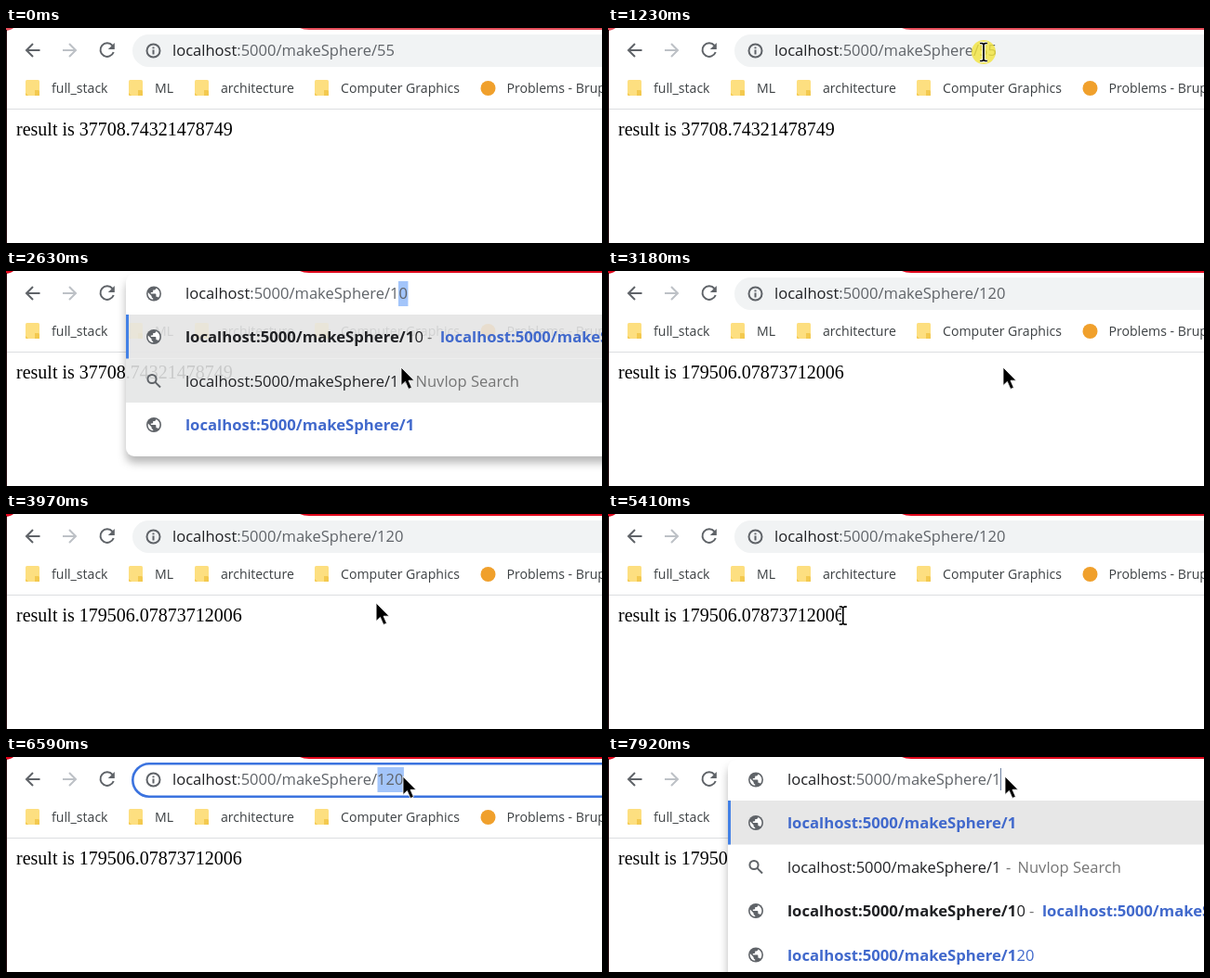
An HTML page for the animation above (8000 ms loop, 641 by 232 pixels).

```html
<!DOCTYPE html>
<html lang="en">
<head>
<meta charset="utf-8">
<title>Address bar demo</title>
<style>
html, body { margin: 0; width: 100%; height: 100%; overflow: hidden; background: #fff; }
svg { display: block; width: 641px; height: 232px; }
text { font: 16.55px "Open Sans", sans-serif; fill: #202124; }
.mark { font-size: 14.1px; fill: #3c4043; }
.page { font: 20px "Liberation Serif", "Times New Roman", serif; fill: #000; }
.dim { fill: #5f6368; }
.note { fill: #757575; }
.bold, .link { font-weight: 700; font-size: 16.7px; }
.link, .blue { fill: #4169cc; }
.panel { filter: drop-shadow(0 7px 5px rgba(0, 0, 0, .28)); }
.line { fill: none; stroke: #5f6368; stroke-width: 2; }
</style>
</head>
<body>
<svg viewBox="0 0 641 232">
  <defs>
    <clipPath id="body"><rect x="129" y="47" width="512" height="153"/></clipPath>
    <g id="globe">
      <circle r="8" fill="#5f6368"/>
      <path d="M-6.2-1.4L-2.4 2.4V3.4Q-2.2 4.8-.8 4.9V6.3Q-5.8 5.4-6.4 .4ZM2.4-5.9Q6.2-4 6.4 0Q6.4 2.2 4.9 4.2Q4.4 3.2 3.2 3.2H2.4V.9Q2.3 0 1.6 0H-3.2V-1.6H-1.6Q-.8-1.7-.8-2.4V-4H.8Q2.3-4.2 2.4-5.9Z" fill="#fff"/>
    </g>
    <g id="lens">
      <circle cx="-2" cy="-2" r="4.6" class="line"/>
      <path d="M1.4 1.4L7 7" class="line"/>
    </g>
    <g id="folder">
      <rect width="15" height="17" rx="1.5" fill="#fddf80"/>
      <path d="M10 17V11H13.5Q15 11 15 12.500V17Z" fill="#f3c94f"/>
      <path d="M0 14L3 17H1.500Q0 17 0 15.500Z" fill="#f3c94f"/>
    </g>
  </defs>
  <g id="scene"></g>
  <circle id="spot" r="13" fill="#f3e33c" opacity=".8"/>
  <path id="arrow" d="M0 0V19.500L4.400 15.400L7.900 23.400L11.400 21.900L8 14.200H14Z" stroke="#fff" stroke-width=".8"/>
  <g id="beam" fill="none">
    <path d="M-4-9.500H-1.500L0-8.500L1.500-9.500H4M0-8.500V8.500M-4 9.500H-1.500L0 8.500L1.500 9.500H4" stroke="#fff" stroke-width="3.500"/>
    <path d="M-4-9.500H-1.500L0-8.500L1.500-9.500H4M0-8.500V8.500M-4 9.500H-1.500L0 8.500L1.500 9.500H4" stroke="#000" stroke-width="1.700"/>
  </g>
</svg>
<script>
const LOOP = 8000, TICK = 68.7;
const PATH = '/makeSphere/', HOST = 'localhost', PORT = ':5000';
const URL_TEXT = HOST + PORT + PATH;
const DIGIT = 9.46, PREFIX = 220.5, ROW = 47.5;
const $ = id => document.getElementById(id);

const text = (x, y, s, cls = '') => `<text x="${x}" y="${y}" class="${cls}">${s}</text>`;
const rect = (x, y, w, h, fill, more = '') =>
  `<rect x="${x}" y="${y}" width="${w}" height="${h}" fill="${fill}" ${more}/>`;
const use = (id, x, y) => `<use href="#${id}" x="${x}" y="${y}"/>`;
const address = (x, tail) =>
  `<text x="${x}" y="30">${HOST}<tspan class="dim">${PORT + PATH + tail}</tspan></text>`;

// Suggestion rows: an icon and [x, text, class] parts
const exact = { icon: 'globe', parts: [[193, URL_TEXT + 1, 'link']] };
const ten = { icon: 'globe', parts: [
  [193, URL_TEXT + 1, 'bold'], [439.5, '0'], [453, '-', 'note'], [467, URL_TEXT + 10, 'link']] };
const recent = { icon: 'globe', parts: [[193, URL_TEXT + 1, 'link'], [439.5, '20', 'blue']] };
const typed120 = { icon: 'globe', parts: [[193, URL_TEXT + 120, 'link']] };
const search = (n, shift) => ({ icon: 'lens', parts: [
  [193, URL_TEXT + n], [428 + shift, '-', 'note'], [440.5 + shift, 'Nuvlop Search', 'note']] });

// Each entry changes the state from its time on
const changes = [
  [0, { strip: '#e6505c', result: '37708.74321478749', tail: '55' }],
  [1300, { strip: '#e0061c', focus: true, pick: 'all' }],
  [1360, { pick: 'tail' }],
  [2630, { tail: '1', auto: '0', rows: [ten, search(1, 0), exact], hover: 1, ghost: true }],
  [2700, { ghost: false }],
  [2760, { tail: '120', auto: '', rows: [typed120, search(120, 2 * DIGIT)] }],
  [3110, { rows: null, focus: false, pick: '', hover: 0 }],
  [3180, { result: '179506.07873712006' }],
  [6310, { focus: true, pick: 'all' }],
  [6450, { pick: 'tail' }],
  [6860, { tail: '1', auto: '0', rows: [ten, search(1, 0), exact, recent], ghost: true }],
  [6930, { ghost: false }],
  [7920, { auto: '', rows: [exact, search(1, 0), ten, recent] }]
];
const states = [];
for (const [at, change] of changes)
  states.push({ ...states[states.length - 1], ...change, at });

function toolbar(s) {
  const tailX = 179 + PREFIX;
  const end = tailX + DIGIT * s.tail.length;
  const from = s.pick === 'all' ? 179 : tailX;
  const pill = s.focus
    ? rect(136.3, 7.3, 700, 35.4, '#fff', 'rx="17.700" stroke="#3b73df" stroke-width="2.600"')
    : rect(136, 7, 700, 35, '#f1f3f4', 'rx="17.500"');
  return `<path d="M0 0H8Q6 2 0 3ZM316 0Q320 2 326 2H641V0Z" fill="${s.strip}"/>
    <path d="M36.500 24H22M29 17L22 24L29 31" class="line"/>
    <path d="M61 24H75M68 17L75 24L68 31" class="line" style="stroke:#bdc1c6"/>
    <path d="M114.500 19A7.300 7.300 0 1 0 115.700 26" class="line"/>
    <path d="M116.800 16V23H109.800Z" fill="#5f6368"/>
    ${pill}
    <circle cx="158.500" cy="24.500" r="7" class="line"/>
    <path d="M158.500 23.500V28.500M158.500 20.500V22.300" class="line"/>
    ${s.pick ? rect(from, 11, end - from, 27, '#a3c5fa') : ''}
    ${address(179, s.tail)}`;
}

function page(s) {
  const marks = [[21, 49, 'full_stack'], [132, 160, 'ML'], [203, 231, 'architecture'], [332, 360, 'Computer Graphics']];
  return marks.map(([x, tx, name]) => use('folder', x, 56) + text(tx, 70, name, 'mark')).join('')
    + '<circle cx="518.500" cy="65" r="8" fill="#f0a02c"/>'
    + text(538.5, 70, 'Problems - Brup', 'mark')
    + rect(0, 87, 641, 1, '#dcdee1')
    + text(11, 116, 'result is ' + s.result, 'page');
}

function panel(s) {
  const caret = 193 + PREFIX + DIGIT * s.tail.length;
  let out = rect(129, 3, 620, 54.5 + ROW * s.rows.length, '#fff', 'rx="9" class="panel"');
  out += rect(129, 47, 512, ROW, '#e7e7e7');
  if (s.hover) out += rect(129, 47 + ROW * s.hover, 512, ROW, '#e7e8e8');
  if (s.ghost) out += `<g clip-path="url(#body)" opacity=".13">${page(s)}</g>`;
  out += rect(129, 47, 3, ROW, '#4381e6');
  out += use('globe', 159, 24.5);
  if (s.auto) out += rect(caret - 1, 11, 10.5, 27, '#a3c5fa') + text(caret - .5, 30, s.auto, 'dim');
  else out += rect(caret - 1, 12, 1, 24, '#6b7f9f');
  out += address(193, s.tail);
  s.rows.forEach((row, i) => {
    const y = 71 + ROW * i;
    out += use(row.icon, 159, y);
    for (const [x, str, cls] of row.parts) out += text(x, y + 6, str, cls);
  });
  return out;
}

function scene(s) {
  return rect(0, 0, 641, 232, '#fff') + toolbar(s) + page(s)
    + rect(0, 2, 1, 230, '#1c0408') + (s.rows ? panel(s) : '');
}

// Pointer track: time, x, y
const track = [
  [0, 559, 260], [200, 559, 260], [260, 558, 222], [480, 495, 150], [690, 463, 92],
  [950, 408, 32], [1010, 404, 26], [1300, 404, 26], [1360, 405, 26], [1570, 405, 26],
  [1770, 425, 104], [3905, 425, 104], [3970, 398, 96], [4180, 310, 92], [4480, 190, 103],
  [4730, 108, 108], [4870, 82, 112], [5080, 130, 111], [5410, 252, 110], [5550, 295, 90],
  [5620, 310, 100], [5900, 380, 62], [6180, 427, 23], [6450, 427, 23], [6590, 427, 21], [LOOP, 427, 21]
];

function pointer(t) {
  const snapped = Math.max(0, 260 + Math.floor((t - 252) / TICK) * TICK);
  const i = Math.max(1, track.findIndex(k => k[0] > snapped));
  const [t0, x0, y0] = track[i - 1], [t1, x1, y1] = track[i];
  const p = (snapped - t0) / (t1 - t0);
  return [x0 + (x1 - x0) * p, y0 + (y1 - y0) * p];
}

const within = (t, a, b) => t >= a && t < b;
const show = (el, on) => { el.style.display = on ? '' : 'none'; };
const spot = $('spot'), arrow = $('arrow'), beam = $('beam');
let shown = null;

function draw(t) {
  const s = states.filter(k => k.at <= t).pop();
  if (s !== shown) {
    $('scene').innerHTML = scene(s);
    shown = s;
  }
  const [x, y] = pointer(t);
  const overText = y > 97 && y < 122 && x > 10 && x < 256;
  const overBar = y < 43 && x > 136 && s.pick !== 'tail';
  const isBeam = !s.rows && (overText || overBar);
  for (const el of [spot, arrow, beam]) el.setAttribute('transform', `translate(${x} ${y})`);
  show(beam, isBeam);
  show(arrow, !isBeam);
  show(spot, within(t, 1080, 1330) || within(t, 6240, 6500));
}

const start = performance.now();
function loop() {
  draw(Math.max(0, performance.now() - start) % LOOP);
  requestAnimationFrame(loop);
}
loop();
</script>
</body>
</html>
```
